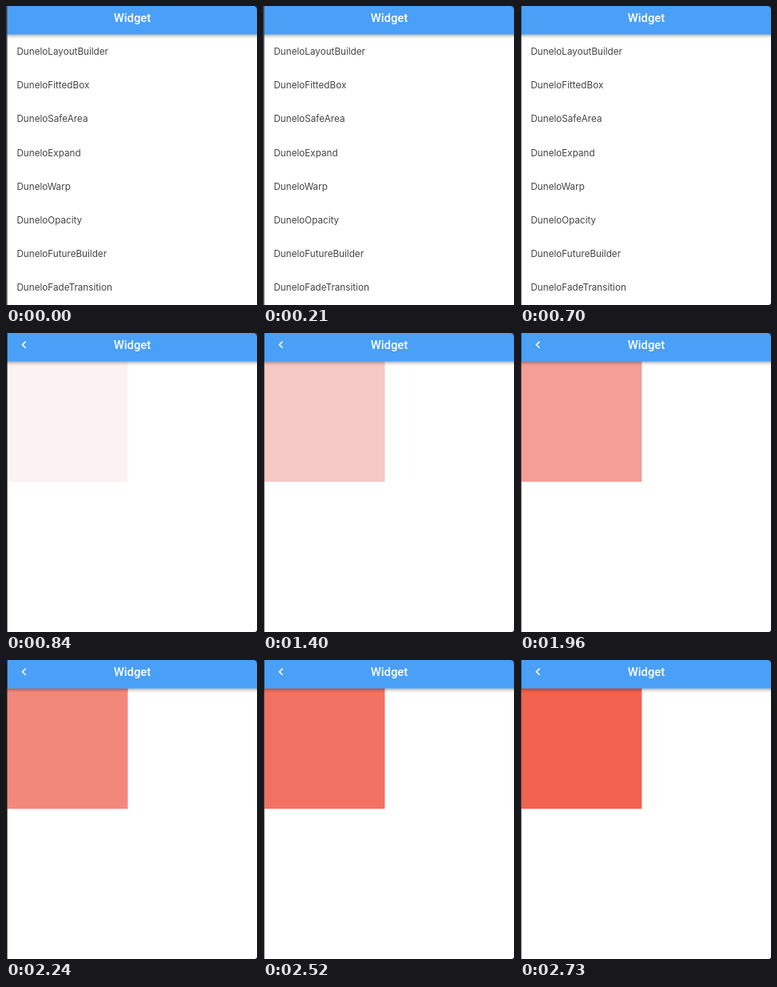
Animation of 314 by 374 pixels, one loop 2800 ms. Source, as an HTML page:

```html
<!DOCTYPE html>
<html lang="en">
<head>
<meta charset="utf-8">
<title>Fade list</title>
<style>
  html, body { margin: 0; width: 100%; height: 100%; overflow: hidden; background: #fff; }
  svg { display: block; width: 314px; height: 374px; }
  .title { font: 500 14.8px Roboto, sans-serif; fill: #fff; text-anchor: middle; }
  .row { font: 400 11.7px Inter, sans-serif; fill: #444; }
</style>
</head>
<body>
<svg viewBox="0 0 314 374">
  <defs>
    <linearGradient id="shade" x1="0" y1="0" x2="0" y2="1">
      <stop offset="0" stop-color="#000" stop-opacity=".34"/>
      <stop offset=".45" stop-color="#000" stop-opacity=".12"/>
      <stop offset="1" stop-color="#000" stop-opacity="0"/>
    </linearGradient>
  </defs>
  <rect width="314" height="374" fill="#fff"/>
  <g id="list"></g>
  <rect id="box" x="1.6" y="35" width="150.8" height="151.1"/>
  <rect y="35.4" width="314" height="5.6" fill="url(#shade)"/>
  <rect width="314" height="35.6" fill="#4a9ff6"/>
  <text class="title" x="158" y="20">Widget</text>
  <path id="back" d="M24.6 10.6 20.5 14.7 24.6 18.8" fill="none" stroke="#fff" stroke-width="1.6"/>
  <rect id="edge" width="1.6" height="374"/>
  <path d="M310.5 0H314V4Q313.4 1 310.5 0Z" fill="#24344c"/>
  <path id="corner" d="M314 371.5V374H311.5Q313.5 373.5 314 371.5Z" fill="#222"/>
</svg>
<script>
const LOOP = 2800, STEP = 70, OPEN = 840;
const names = ["LayoutBuilder", "FittedBox", "SafeArea", "Expand", "Warp",
  "Opacity", "FutureBuilder", "FadeTransition"].map(n => "Dunelo" + n);

// time, then red, green, blue of the fading square
const tints = [
  [840, 252, 242, 241],
  [1400, 245, 200, 197],
  [1960, 244, 158, 151],
  [2240, 242, 136, 124],
  [2730, 241, 98, 80]
];

const $ = id => document.getElementById(id);
const list = $("list"), box = $("box"), back = $("back"), edge = $("edge"), corner = $("corner");

names.forEach((name, i) => {
  const row = document.createElementNS("http://www.w3.org/2000/svg", "text");
  row.setAttribute("class", "row");
  row.setAttribute("x", 13.4);
  row.setAttribute("y", 61 + 42.2 * i);
  row.textContent = name;
  list.append(row);
});

const clamp = v => Math.min(1, Math.max(0, v));
const show = (el, on) => el.setAttribute("visibility", on ? "visible" : "hidden");
const rgb = c => `rgb(${c.map(Math.round).join()})`;

function tintAt(t) {
  let i = 0;
  while (i < tints.length - 2 && t >= tints[i + 1][0]) i++;
  const [t0, ...a] = tints[i], [t1, ...b] = tints[i + 1];
  const k = clamp((t - t0) / (t1 - t0));
  return rgb(a.map((v, j) => v + (b[j] - v) * k));
}

function draw(ms) {
  const t = Math.floor((ms % LOOP) / STEP) * STEP;
  const open = t >= OPEN;
  show(list, !open);
  show(box, open);
  show(back, open);
  box.setAttribute("fill", tintAt(t));

  const dark = clamp((t - 490) / 210);
  const grey = 68 - 50 * dark;
  edge.setAttribute("fill", rgb([grey, grey, grey]));
  corner.setAttribute("opacity", dark);
}

const start = performance.now();
function tick() {
  draw(performance.now() - start);
  requestAnimationFrame(tick);
}
tick();
</script>
</body>
</html>
```
